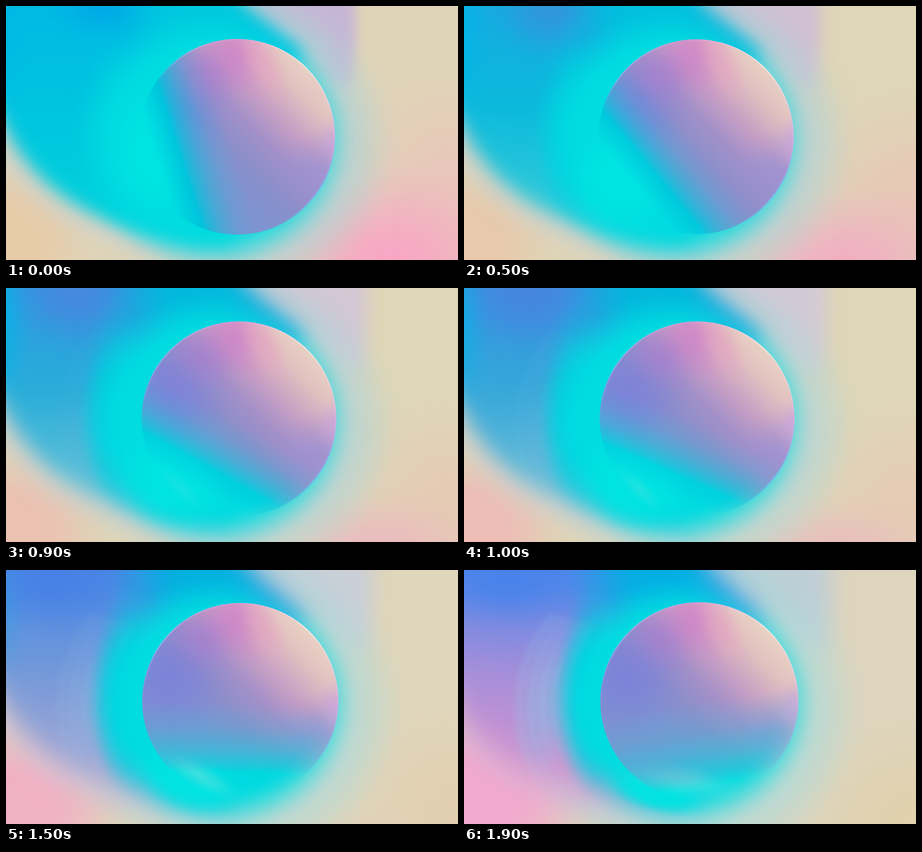
An HTML page with a canvas that plays this animation: 960x540 px, repeating every 2 s.

```html
<!DOCTYPE html>
<html lang="en">
<head>
<meta charset="utf-8">
<title>Soft sphere</title>
<style>
  html, body { margin: 0; width: 100%; height: 100%; overflow: hidden; background: #dfd4b8; }
  canvas { display: block; width: 100vw; height: 100vh; }
</style>
</head>
<body>
<canvas id="stage" width="960" height="540"></canvas>
<script>
const W = 960, H = 540, LOOP = 2000, STEP = 100;
const KEYS = [0, 700, 1200, 1900];
const stage = document.getElementById('stage').getContext('2d');
const newLayer = () => Object.assign(document.createElement('canvas'), { width: W, height: H }).getContext('2d');
const swirl = newLayer(), ball = newLayer();
let now = 0;

const lerp = (a, b, f) => a + (b - a) * f;
const smooth = f => f * f * (3 - 2 * f);
const rgb = hex => [1, 3, 5].map(i => parseInt(hex.slice(i, i + 2), 16));

// A value is either constant or one entry per key time.
function span(list) {
  let i = 0;
  while (i < KEYS.length - 2 && now > KEYS[i + 1]) i++;
  return [list[i], list[i + 1], (now - KEYS[i]) / (KEYS[i + 1] - KEYS[i])];
}
const num = v => Array.isArray(v) ? lerp(...span(v)) : v;
function tint(v, alpha = 1) {
  const [a, b, f] = Array.isArray(v) ? span(v) : [v, v, 0];
  const to = rgb(b);
  return `rgba(${rgb(a).map((c, i) => lerp(c, to[i], f).toFixed(1))},${alpha})`;
}

function blob(g, { x, y, rx, ry = rx, rot = 0, color, alpha = 1, hold = 0 }) {
  const a = num(alpha), fill = g.createRadialGradient(0, 0, 0, 0, 0, 1);
  for (let k = 0; k <= 8; k++) {
    fill.addColorStop(hold + (1 - hold) * k / 8, tint(color, a * (1 - smooth(k / 8))));
  }
  g.save();
  g.translate(num(x), num(y));
  g.rotate(num(rot) * Math.PI / 180);
  g.scale(num(rx), num(ry));
  g.fillStyle = fill;
  g.beginPath();
  g.arc(0, 0, 1, 0, 7);
  g.fill();
  g.restore();
}

function ramp(g, [x0, y0, x1, y1], stops) {
  const fill = g.createLinearGradient(x0, y0, x1, y1);
  stops.forEach(([at, color]) => fill.addColorStop(at, color));
  return fill;
}

const backdrop = [
  { x: 960, y: [370, 440, 490, 540], rx: 300, ry: 260, color: ['#e9c6ba', '#e8c6b4', '#e4cdb2', '#e1d0aa'], alpha: .9 },
  { x: [820, 800, 770, 760], y: [545, 560, 590, 640], rx: [340, 300, 230, 160], ry: [240, 180, 140, 100],
    color: ['#f8a6c4', '#f0b0c2', '#e8bcc0', '#e0c8c0'], alpha: [1, .95, .8, 0] },
  { x: [0, 0, 0, 20], y: [500, 510, 520, 480], rx: [200, 220, 250, 290], ry: [190, 190, 200, 210],
    color: ['#e7cba8', '#e8c8ac', '#f0b6bc', '#f2aace'], hold: .3 }
];

const veil = { x: 485, y: 290, rx: [360, 365, 375, 380], ry: [350, 350, 360, 380], hold: .6,
  color: ['#b0d2d6', '#b4d2d6', '#b4d8d8', '#b0dad8'], alpha: .88 };

const swirlTints = [
  { x: -15, y: 60, rx: 75, ry: 240, color: '#00b6e8', alpha: [.5, .95, .4, 0] },
  { x: [220, 175, 110, 90], y: [-10, 0, 10, 20], rx: [150, 150, 190, 190], ry: [100, 150, 150, 110],
    color: ['#00a6e6', '#4a8cd8', '#467ee2', '#4882ea'], alpha: .9 },
  { x: 170, y: [280, 280, 300, 290], rx: 80, ry: 200, rot: 8, color: '#8cb4e2', alpha: [0, 0, .15, .6] },
  { x: [410, 400, 420, 420], y: 20, rx: [210, 210, 215, 220], ry: [160, 170, 190, 210], hold: .2,
    color: ['#00c8de', '#00bedc', '#00b4dc', '#00b0e2'], alpha: .95 },
  { x: [230, 235, 250, 275], y: 260, rx: [90, 95, 90, 85], ry: 250, hold: .25,
    color: ['#00d0de', '#00c8dc', '#00c4de', '#00c4de'], alpha: [.4, .8, .95, .95] }
];

const ring = { x: [438, 441, 449, 460], y: 283, rx: [305, 302, 300, 296], ry: [290, 288, 286, 282],
  hold: .64, color: '#00dce0' };
const core = { x: [325, 345, 375, 410], y: [310, 385, 425, 475], rx: [115, 130, 140, 120], ry: [165, 130, 105, 45],
  rot: [0, 20, 25, 15], hold: .3, color: '#00e4e2', alpha: .9 };
const glint = { x: [372, 372, 375, 460], y: [425, 425, 430, 445], rx: [75, 75, 78, 150], ry: [22, 22, 25, 42],
  rot: [46, 46, 44, 10], color: '#74dede', alpha: [0, 0, .4, .6] };

const ballTints = [
  { x: 345, y: 225, rx: 150, color: '#7a7ade', alpha: .62 },
  { x: 430, y: 140, rx: 100, ry: 90, color: '#a87cce', alpha: .6 },
  { x: 490, y: 95, rx: 85, ry: 130, rot: -26, color: '#cf80c8', alpha: .75 },
  { x: 548, y: 125, rx: 50, ry: 100, rot: -28, color: '#e6a8c0', alpha: .65 },
  { x: 670, y: 360, rx: 130, ry: 110, color: '#9690d4', alpha: .7 },
  { x: 702, y: 290, rx: 48, ry: 70, color: '#c8a2e0', alpha: .65 }
];

function swirlPath(g) {
  const left = num([262, 265, 270, 315]), top = num([510, 515, 520, 530]);
  g.beginPath();
  g.moveTo(-120, -100);
  g.lineTo(top - 70, -100);
  g.lineTo(top, 0);
  g.lineTo(630, 100);
  g.lineTo(500, 300);
  g.lineTo(480, 500);
  g.bezierCurveTo(300, 505, 90, 445, 0, left);
  g.lineTo(-120, left - 230);
  g.closePath();
}

function drawBackdrop() {
  stage.fillStyle = tint(['#e0d4b8', '#dfd6b6', '#dfd6b8', '#ded5be']);
  stage.fillRect(0, 0, W, H);
  backdrop.forEach(b => blob(stage, b));

  // Lavender sheet at the top right
  stage.filter = `blur(${num([12, 16, 20, 24])}px)`;
  stage.fillStyle = tint(['#c6b6d6', '#d4c2d2', '#d2ced8', '#becdd6']);
  const edge = num([738, 758, 772, 775]);
  stage.beginPath();
  stage.moveTo(480, -40);
  stage.lineTo(edge, -40);
  stage.quadraticCurveTo(edge + 15, 90, edge - 15, 185);
  stage.lineTo(600, 100);
  stage.fill();

  // Pale fringe around the swirl
  stage.filter = 'blur(24px)';
  stage.strokeStyle = ramp(stage, [200, 0, 480, 0], [
    [0, tint(['#ccd2d0', '#ccd0ce', '#d2cdd0', '#dcb2d6'], .75)],
    [1, tint(['#a8c8d4', '#acc8d4', '#b4c8d6', '#a0c6d8'], .75)]
  ]);
  stage.lineWidth = 80;
  swirlPath(stage);
  stage.stroke();
  stage.filter = 'none';
  blob(stage, veil);
}

function drawSwirl() {
  const g = swirl;
  g.clearRect(0, 0, W, H);
  g.filter = `blur(${num([18, 20, 23, 26])}px)`;
  g.fillStyle = ramp(g, [130, 0, 100, 430], [
    [0, tint(['#00b9e4', '#1ea4e0', '#4488e2', '#4a86ea'])],
    [.5, tint(['#00c4df', '#10b4da', '#4c9fd8', '#a48eda'])],
    [1, tint(['#00d0dc', '#48c8d8', '#86b8d8', '#d692ce'])]
  ]);
  swirlPath(g);
  g.fill();
  g.filter = 'none';
  g.globalCompositeOperation = 'source-atop';
  swirlTints.forEach(b => blob(g, b));

  // Feathered arcs trailing on the left
  g.filter = 'blur(5px)';
  g.lineWidth = 18;
  g.strokeStyle = tint('#a6cae8', num([0, 0, .05, .14]));
  for (let i = 0; i < 5; i++) {
    g.beginPath();
    g.ellipse(480, 290, 265 + i * 25, 285 + i * 8, 0, 2.5, 3.8);
    g.stroke();
  }
  g.filter = 'none';
  g.globalCompositeOperation = 'source-over';

  stage.drawImage(g.canvas, 0, 0);
  blob(stage, ring);
  blob(stage, core);
}

function drawBall() {
  const g = ball;
  const cx = num([491, 494, 496, 500]), cy = num([278, 278, 278, 279]), r = num([208, 207, 207, 210.5]);
  const sx = num([365, 400, 440, 500]), sy = num([305, 352, 408, 460]);
  const ex = 470, ey = num([272, 273, 285, 288]);
  const disc = c => { c.beginPath(); c.arc(cx, cy, r, 0, 7); };

  // Shade just outside the fading side
  const back = 48 / Math.hypot(ex - sx, ey - sy);
  const bx = sx - (ex - sx) * back, by = sy - (ey - sy) * back;
  stage.save();
  disc(stage);
  stage.clip();
  stage.fillStyle = ramp(stage, [bx, by, sx, sy], [
    [0, tint('#00bedc', 0)], [1, tint('#00bedc', num([.8, .6, .2, 0]))]
  ]);
  stage.fillRect(0, 0, W, H);
  stage.restore();
  blob(stage, glint);

  g.clearRect(0, 0, W, H);
  g.save();
  disc(g);
  g.fillStyle = ramp(g, [640, 110, 420, 330], [
    [0, '#e9d4c4'], [.2, '#e2c2c0'], [.42, '#c8a0c4'], [.6, '#a490c8'], [.8, '#8a8fca'], [1, '#7f93d0']
  ]);
  g.fill();
  g.globalCompositeOperation = 'source-atop';
  ballTints.forEach(b => blob(g, b));

  const rim = g.createConicGradient(0, cx, cy);
  [[0, '#d8bcec', .6], [.06, '#8cb4ff', .7], [.11, '#70ccff', .9], [.2, '#70ccff', 0], [.48, '#8cb0ff', 0],
   [.6, '#a0d0ff', .7], [.75, '#dc9ce0', .6], [.87, '#fff4ee', .9], [1, '#d8bcec', .6]]
    .forEach(([at, color, a]) => rim.addColorStop(at, tint(color, a)));
  g.strokeStyle = rim;
  g.lineWidth = 4;
  g.filter = 'blur(1px)';
  disc(g);
  g.stroke();
  g.filter = 'none';

  g.globalCompositeOperation = 'destination-in';
  g.fillStyle = ramp(g, [sx, sy, ex, ey], [
    [0, 'rgba(0,0,0,0)'], [.12, 'rgba(0,0,0,.26)'], [.35, 'rgba(0,0,0,.58)'], [.65, 'rgba(0,0,0,.86)'], [1, '#000']
  ]);
  g.fillRect(0, 0, W, H);
  g.restore();
  stage.drawImage(g.canvas, 0, 0);
}

let shown = -1;
function tick(time) {
  now = Math.floor(time % LOOP / STEP) * STEP;
  if (now !== shown) {
    shown = now;
    drawBackdrop();
    drawSwirl();
    drawBall();
  }
  requestAnimationFrame(tick);
}
tick(performance.now());
</script>
</body>
</html>
```
